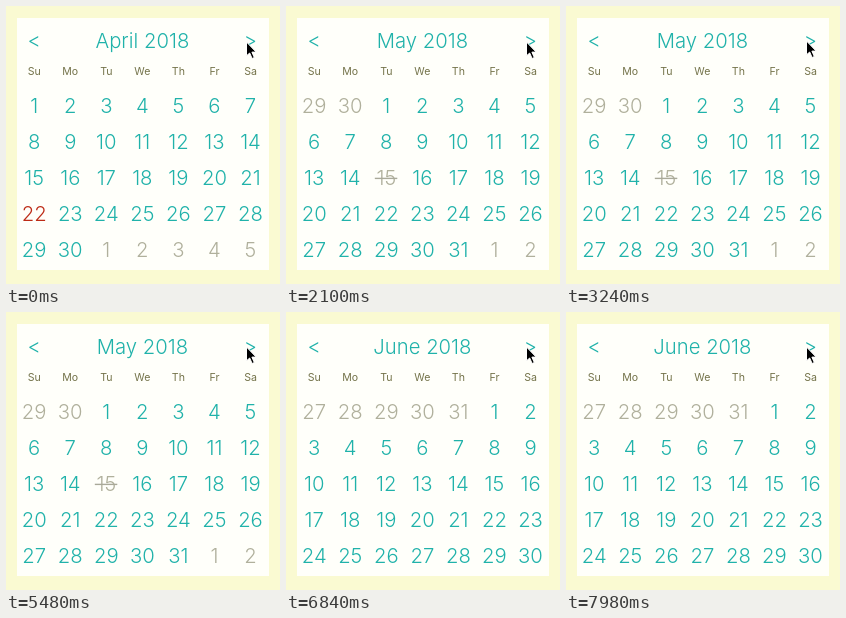
Write an HTML page that moves like this. It is 274 px wide and 278 px high and loops after 8 s.

```html
<!DOCTYPE html>
<html lang="en">
<head>
<meta charset="utf-8">
<title>Calendar</title>
<style>
  html, body { margin: 0; width: 100%; height: 100%; overflow: hidden; background: #fafad2; }
  svg { display: block; }
  text { font: 350 20.3px Inter, sans-serif; text-anchor: middle; fill: #20b2aa; }
  .weekday { font: 10.6px Inter, sans-serif; fill: #74734a; }
  .outside { fill: #b0b09c; }
  .today { fill: #bd2b16; }
</style>
</head>
<body>
<svg width="274" height="278" viewBox="0 0 274 278">
  <rect x="11" y="12" width="252" height="252" fill="#fffffa"/>
  <g id="calendar"></g>
  <path id="cursor" d="M0 0V13.8L3.2 11 5.6 16.5 7.8 15.5 5.4 10.1H9.7Z" stroke="#fff" stroke-width="1"/>
</svg>
<script>
const LOOP = 8000, YEAR = 2018;
const calendar = document.getElementById('calendar');
const cursor = document.getElementById('cursor');
const columnX = i => 28.2 + 36.05 * i;

function add(parent, tag, attributes, content = '') {
  const node = document.createElementNS('http://www.w3.org/2000/svg', tag);
  for (const key in attributes) node.setAttribute(key, attributes[key]);
  node.textContent = content;
  return parent.appendChild(node);
}

const label = (parent, content, x, y, kind = '') =>
  add(parent, 'text', { x, y, class: kind }, content);

function buildMonth(name, month) {
  const group = add(calendar, 'g', {});
  const offset = new Date(YEAR, month, 1).getDay();
  label(group, `${name} ${YEAR}`, 136.4, 42.2);
  for (let i = 0; i < 35; i++) {
    const date = new Date(YEAR, month, 1 - offset + i);
    const day = date.getDate(), inMonth = date.getMonth() === month;
    const x = columnX(i % 7), y = 107.4 + 36 * Math.floor(i / 7);
    const disabled = inMonth && month === 4 && day === 15;
    const today = inMonth && month === 3 && day === 22;
    label(group, day, x, y, today ? 'today' : inMonth && !disabled ? '' : 'outside');
    if (disabled) add(group, 'path', { d: `M${x - 11.5} ${y - 7}h22.5`, stroke: '#a9a999', 'stroke-width': 1.4 });
  }
  return group;
}

label(calendar, '<', columnX(0), 42.2);
label(calendar, '>', columnX(6), 42.2);
['Su', 'Mo', 'Tu', 'We', 'Th', 'Fr', 'Sa'].forEach((name, i) =>
  label(calendar, name, columnX(i), 68.5, 'weekday'));
const months = ['April', 'May', 'June'].map((name, i) => buildMonth(name, i + 3));

function draw() {
  const t = performance.now() % LOOP;
  const shown = t < 2080 ? 0 : t < 5900 ? 1 : 2;
  months.forEach((group, i) => group.setAttribute('visibility', i === shown ? 'visible' : 'hidden'));
  cursor.setAttribute('transform', `translate(240.5 ${t < 2920 ? 36 : 35})`);
  requestAnimationFrame(draw);
}
draw();
</script>
</body>
</html>
```
